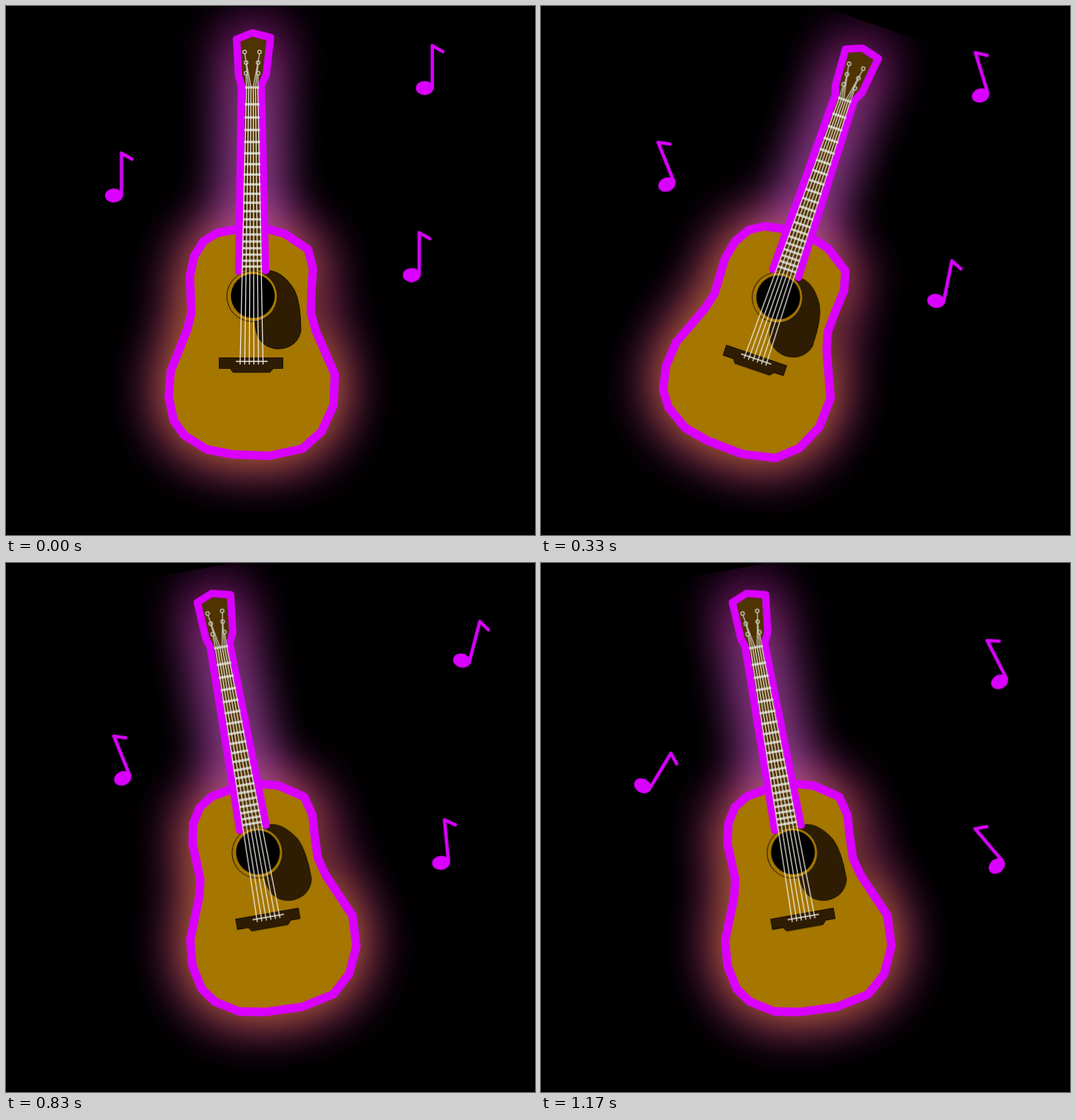
Recreate the animation shown at these times as an HTML page. Size 748x748 px, loop 1340 ms.

```html
<!DOCTYPE html>
<html lang="en">
<head>
<meta charset="utf-8">
<title>Swinging neon guitar</title>
<style>
  html, body { margin: 0; width: 100%; height: 100%; overflow: hidden; background: #000; }
  svg { display: block; width: 100vw; height: 100vh; }
  .neon { fill: none; stroke: #da00ff; stroke-linecap: round; stroke-linejoin: round; }
  .wood { fill: #4f3300; }
  .gold { fill: #a57600; }
  .dark { fill: #2e1d02; stroke: #120b00; stroke-width: 1; }
  .fret { stroke: #c6c3b8; stroke-width: 3.4; }
  .string { fill: none; stroke: #f2efe6; stroke-width: 1.3; }
  .peg { fill: none; stroke: #c6c3b8; stroke-width: 1.4; }
</style>
</head>
<body>
<svg viewBox="0 0 748 748">
  <defs>
    <filter id="glow" filterUnits="userSpaceOnUse" x="60" y="1" width="580" height="800"
            color-interpolation-filters="sRGB">
      <feGaussianBlur stdDeviation="38" result="blur"/>
      <feMerge><feMergeNode in="blur"/><feMergeNode in="blur"/></feMerge>
    </filter>
    <g id="note">
      <ellipse rx="12.5" ry="10" fill="#da00ff"/>
      <path class="neon" stroke-width="4.8" d="M10.800 0V-60L25.500 -51.500"/>
    </g>
  </defs>

  <g id="swing">
    <g transform="translate(-348 -368)">
      <use href="#guitar" filter="url(#glow)"/>
      <g id="guitar">
        <path class="neon gold" stroke-width="12" d="M330 315L298 321 279 333 266 354 260 382 262 434
          256 458 233 516 230 552 237 586 252 607 284 627 320 634 372 636 419 626 446 602 463 565
          465 521 438 459 431 433 432 401 434 371 427 344 394 322 368 315"/>
        <path class="dark" d="M366 374Q390 372 408 402 417 420 417 460 411 484 384 485
          352 482 352 445L366 410Z"/>
        <circle class="gold" cx="348" cy="410.5" r="35.7" stroke="#140c00"/>
        <circle cx="349" cy="410" r="31"/>
        <path class="dark" d="M301.500 497.500h90v15H378L373 518H321L317 512.500H301.500Z"/>
        <path class="neon wood" stroke-width="10.5" d="M329 375L333 112 329 100 326 47 348 38
          374 44.500 368 97 361 112 367 374"/>
        <g id="frets" class="fret"></g>
        <g id="strings" class="string"><path d="M325 502.500H370"/></g>
        <g id="pegs" class="peg"></g>
      </g>
    </g>
  </g>
  <use href="#note" class="tune"/>
  <use href="#note" class="tune"/>
  <use href="#note" class="tune"/>
</svg>

<script>
const LOOP = 1340, STEPS = 8;
const $ = id => document.getElementById(id);

function add(parent, tag, attrs) {
  const el = document.createElementNS(parent.namespaceURI, tag);
  for (const key in attrs) el.setAttribute(key, attrs[key]);
  parent.appendChild(el);
}
const line = (parent, x1, y1, x2, y2) => add(parent, 'line', { x1, y1, x2, y2 });

// The nut, then frets whose gaps shrink by a constant ratio
function fret(y) {
  const k = (y - 115) / 260;
  line($('frets'), 338 - 4 * k, y, 358 + 4 * k, y);
}
fret(115);
for (let i = 0, y = 139, gap = 18.6; i < 19; i++, y += gap, gap *= 0.953) fret(y);

for (let i = 0; i < 6; i++) line($('strings'), 340 + 3.2 * i, 115, 331 + 6.5 * i, 507);

// Mirrored pegs, each with its string running to the nut
for (let i = 0; i < 3; i++) {
  for (const side of [-1, 1]) {
    const x = 348 + side * (i ? 8.5 : 10.5), y = 65 + 15 * i;
    add($('pegs'), 'circle', { cx: x, cy: y, r: 2.5 });
    line($('pegs'), x, y + 2.5, 348 + side * (1.6 + 3.2 * i), 115);
  }
}

// Six poses a second, on a clock of hundredths
const time = k => Math.round(k * 100 / 6) * 10;

// pose(k) gives [x, y, degrees], held until the next step
function play(el, pose) {
  const frames = [];
  for (let k = 0; k <= STEPS; k++) {
    const [x, y, deg] = pose(k % STEPS);
    frames.push({
      offset: k < STEPS ? time(k) / LOOP : 1,
      transform: `translate(${x}px, ${y}px) rotate(${deg}deg)`,
      easing: 'step-end'
    });
  }
  el.animate(frames, { duration: LOOP, iterations: Infinity });
}

// Triangle wave between -2 and 2; the guitar dips at both ends
play($('swing'), k => {
  const tri = Math.abs((k + 2) % 8 - 4) < 5 ? 2 - Math.abs((k + 6) % 8 - 4) : 0;
  const lean = -tri * (k % 4 === 0 ? 0 : 1);
  const swing = Math.abs((k + 6) % 8 - 4) - 2;
  return [348, 368 + 4 * Math.max(0, Math.abs(lean) - 1), 9.4 * swing - 0.6 * (k % 2)];
});

// Notes move four times a second, easing away from each key pose
const mix = (a, b, t) => a.map((v, i) => v + (b[i] - v) * t);
function drift(keys) {
  return k => {
    const n = Math.floor((k + 1) * 2 / 3), i = n >> 1;
    return n > 4 ? keys[3] : mix(keys[i], keys[i + 1], n % 2 * 0.15);
  };
}

const tunes = [
  [[152.5, 268, 0], [178, 252.5, -22], [165, 304.5, -22], [143.5, 315, 31]],
  [[592, 116, 0], [621.5, 126.5, -17], [644.5, 138, 14.5], [648.5, 168, -27]],
  [[573.5, 380.5, 0], [558.5, 417, 11.5], [615, 424, -5.5], [644.5, 428.5, -40.5]]
];
document.querySelectorAll('.tune').forEach((el, i) => play(el, drift(tunes[i])));
</script>
</body>
</html>
```
